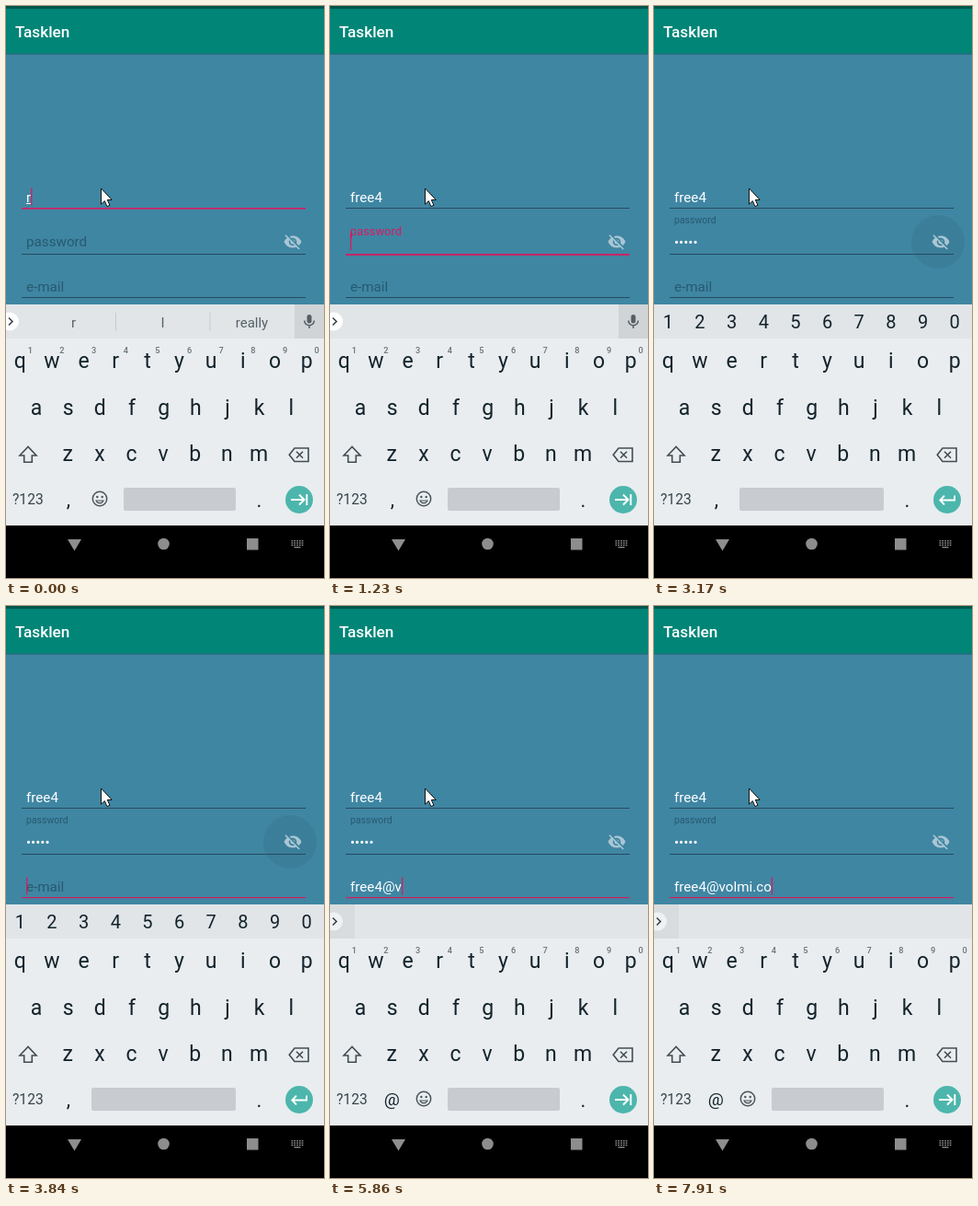
Animation of 346 by 621 pixels, one loop 8 s. Source, as an HTML page:

```html
<!DOCTYPE html>
<html lang="en">
<head>
<meta charset="utf-8">
<title>Sign-up form</title>
<style>
html, body { margin: 0; width: 100%; height: 100%; overflow: hidden; background: #000; }
svg { display: block; width: 346px; height: 621px; font-family: Roboto, sans-serif; }
</style>
</head>
<body>
<svg id="stage" viewBox="0 0 346 621"></svg>
<script>
const LOOP = 8000, SIZE = 15.2, LEFT = 22;
const PINK = '#d81b60', INK = '#13232b', GREY = '#566168', HINT = '#275a6f';

// Each step changes part of the state and holds until the next one.
const steps = [
  [0, { focus: 'user', user: 'r', pass: '', mail: '', composing: true, cursor: true,
        words: ['r', 'I', 'really'], keys: 'text', enter: 'next', rise: 0, ripple: false }],
  [140, { user: '', words: [] }],
  [270, { user: 'f', words: ['f', 'I', 'for'] }],
  [410, { user: 'fr', words: ['fr', 'from', 'free'] }],
  [680, { user: 'fre', words: ['fre', 'free', 'freeing'] }],
  [830, { user: 'free', words: ['free', 'freely', 'freedom'] }],
  [950, { user: 'free4', words: ['free4'] }],
  [1230, { focus: 'pass', composing: false, words: [], rise: .5 }],
  [1370, { keys: 'pass', rise: 1 }],
  [1500, { pass: 't' }],
  [1780, { pass: '••s' }],
  [2370, { cursor: false }],
  [2650, { pass: '•••t', cursor: true }],
  [3050, { pass: '••••1' }],
  [3170, { pass: '•••••', focus: 'eye', enter: 'return', ripple: true }],
  [3840, { focus: 'mail' }],
  [3990, { keys: 'mail', enter: 'next', ripple: false }],
  [4120, { mail: 'f', composing: true, words: ['f', 'f+'] }],
  [4250, { mail: 'fr', words: ['fr', 'fr+'] }],
  [4380, { mail: 'fre', words: ['fre', 'fre+'] }],
  [4500, { mail: 'free', words: ['free', 'free+'] }],
  [4870, { mail: 'free4', words: ['free4'] }],
  [5430, { mail: 'free4@', composing: false, words: [] }]
];
const typeDomain = (start, gap, parts) => parts.forEach((part, i) =>
  steps.push([start + gap * i, { mail: 'free4@' + part, words: part.endsWith('.c') ? ['c'] : [] }]));
typeDomain(5860, 138.5, ['v', 'vo', 'vol', 'voli', 'volim', 'vol', 'vo', 'v']);
typeDomain(6970, 156.6, ['vo', 'vol', 'volm', 'volmi', 'volmi.', 'volmi.c', 'volmi.co']);

const ruler = document.createElement('canvas').getContext('2d');
const measure = s => {
  ruler.font = `${SIZE}px Roboto, sans-serif`;
  return ruler.measureText(s).width;
};

const rect = (x, y, w, h, fill, extra = '') =>
  `<rect x="${x}" y="${y}" width="${w}" height="${h}" fill="${fill}" ${extra}/>`;
const circle = (x, y, r, fill, extra = '') =>
  `<circle cx="${x}" cy="${y}" r="${r}" fill="${fill}" ${extra}/>`;
const text = (s, x, y, size, fill, extra = '') =>
  `<text x="${x}" y="${y}" font-size="${size}" fill="${fill}" ${extra}>${s}</text>`;
const mid = (s, x, y, size, fill, extra = '') =>
  text(s, x, y, size, fill, 'text-anchor="middle" ' + extra);
const stroke = (d, color, width) =>
  `<path d="${d}" fill="none" stroke="${color}" stroke-width="${width}"/>`;
const shape = (d, fill, extra = '') => `<path d="${d}" fill="${fill}" ${extra}/>`;
const row = (chars, x, y, size, fill, extra) =>
  [...chars].map((c, i) => mid(c, x + 34.65 * i, y, size, fill, extra)).join('');

const EYE = 'M12 7c2.76 0 5 2.24 5 5 0 .65-.13 1.26-.36 1.83l2.92 2.92c1.51-1.26 2.7-2.89 3.43-4.75' +
  '-1.73-4.39-6-7.5-11-7.5-1.4 0-2.74.25-3.98.7l2.16 2.16C10.74 7.13 11.35 7 12 7z' +
  'M2 4.27l2.74 2.74C3.08 8.3 1.78 10.02 1 12c1.73 4.39 6 7.5 11 7.5 1.55 0 3.03-.3 4.38-.84' +
  'L19.73 22 21 20.73 3.27 3z' +
  'M7.53 9.8l1.55 1.55c-.05.21-.08.43-.08.65 0 1.66 1.34 3 3 3 .22 0 .44-.03.65-.08l1.55 1.55' +
  'c-.67.33-1.41.53-2.2.53-2.76 0-5-2.24-5-5 0-.79.2-1.53.53-2.2z' +
  'm4.31-.78l3.15 3.15.02-.16c0-1.66-1.34-3-3-3z';

function field(s, name, base, lineY, heavy) {
  const on = s.focus === name, value = s[name], w = measure(value);
  let out = on ? rect(17, lineY, 309, heavy, PINK) : rect(17, lineY, 309, 1, '#264b5c');
  out += text(value, LEFT, base, SIZE, '#fff');
  if (on && s.composing && value) out += rect(LEFT, base + 1, w, 1, '#fff');
  if (on && s.cursor) out += rect(LEFT + w, base - 15.5, 1.3, 19, PINK);
  return out;
}

function form(s) {
  const rise = s.rise, labelColor = s.focus === 'pass' ? PINK : HINT;
  return rect(0, 0, 346, 324, '#3f86a3') +
    rect(0, 51, 346, 2, '#2d6f83') +
    rect(0, 0, 346, 3, '#00574b') + rect(0, 3, 346, 48.5, '#008577') +
    text('Tasklen', 10, 33.5, 17.2, '#fff', 'font-weight="500"') +
    (s.ripple ? circle(309, 256, 29, '#000', 'opacity=".06"') : '') +
    text('password', LEFT, 261 - 25 * rise, SIZE - 4.7 * rise, labelColor) +
    (s.mail ? '' : text('e-mail', LEFT, 310, SIZE, HINT)) +
    field(s, 'user', 213, 219, 1.6) +
    field(s, 'pass', 261.5, 269, 1.8) +
    field(s, 'mail', 310, 316, 1.2) +
    shape(EYE, '#a9c6d3', 'transform="translate(301.7 245.7) scale(.86)"');
}

function strip(s) {
  if (s.keys === 'pass') return row('1234567890', 15.3, 350, 20, INK);
  const mail = s.keys === 'mail', [a, b, c] = s.words;
  let out = mail ? rect(0, 324, 27, 37, '#d8dcde') : rect(314, 324, 32, 37, '#d0d4d7');
  out += circle(4, 342.5, 10, mail ? '#eff2f4' : '#fff') + stroke('M3 338.5l4 4-4 4', '#37424a', 1.6);
  if (!mail) {
    out += rect(327.5, 335, 5, 9.5, '#555f65', 'rx="2.5"') +
      stroke('M324.7 341.5a5.3 5.3 0 0 0 10.6 0M330 347v3', '#555f65', 1.5);
  }
  if (!a) return out;
  if (!b) return out + mid(a, 170.5, 349, 15, GREY);
  out += rect(119, 333, 1, 20, '#c6cbce') + rect(221.5, 333, 1, 20, '#c6cbce');
  out += mid(a, 73.5, 349, 15, GREY);
  if (!b.endsWith('+')) return out + mid(b, 170.5, 349, 15, GREY) + mid(c, 267.5, 349, 15, GREY);
  return out + mid(b.slice(0, -1), 170.5, 338.5, 13.7, GREY, 'font-weight="500"') +
    mid('@volmi.com', 170.5, 353, 10.6, GREY);
}

function keyboard(s) {
  const pass = s.keys === 'pass', spaceX = pass ? 93 : 128;
  let out = rect(0, 324, 346, 240, '#e9edf0') + rect(0, 324, 346, 37, '#e1e5e8') + strip(s);
  out += row('qwertyuiop', 15.3, 393, 23, INK) + row('asdfghjkl', 33, 444, 23, INK) +
    row('zxcvbnm', 67.2, 494, 23, INK);
  if (!pass) out += row('1234567890', 26.3, 376.5, 9.2, '#677277', 'font-weight="500"');
  out += stroke('M24 478.5L15 488h4.7v7.3h8.6V488H33z', '#424d53', 1.6) +
    stroke('M314 480h15v14.5h-15l-5.8-7.2zM316 483.8l7 7m0-7l-7 7', '#424d53', 1.6) +
    text('?123', 7, 541, 15.6, '#37444b') +
    (s.keys === 'mail' ? mid('@', 67.3, 542, 19, INK) : mid(',', 68, 543, 22, INK)) +
    mid('.', 275.5, 543.5, 22, INK) +
    rect(spaceX, 523, 250 - spaceX, 25, '#c8ccd0', 'rx="2"');
  if (!pass) {
    out += circle(102, 535, 7.7, 'none', 'stroke="#4a555b" stroke-width="1.5"') +
      circle(99.3, 533, 1.2, '#4a555b') + circle(104.7, 533, 1.2, '#4a555b') +
      stroke('M98 537a4.3 4.3 0 0 0 8 0z', '#4a555b', 1.2);
  }
  out += circle(319, 536, 15, '#4db6ac');
  return out + stroke(s.enter === 'next'
    ? 'M310 536h14M319 530.5l5.5 5.5-5.5 5.5M327.3 530v12'
    : 'M327 531.5v5h-15.5M316 531.7l-4.7 4.8 4.7 4.8', '#fff', 1.9);
}

function navBar() {
  let dots = '';
  for (let i = 0; i < 15; i++) dots += rect(310.5 + i % 5 * 2.8, 580 + Math.floor(i / 5) * 2.3, 1.7, 1.4, '#8d8d8d');
  return rect(0, 564, 346, 57, '#000') + shape('M67 579h15l-7.5 12.5z', '#8d8d8d') +
    circle(171.5, 584, 6.3, '#8d8d8d') + rect(262, 578, 12.5, 12.5, '#8d8d8d') +
    dots + rect(313.5, 587, 7, 1.3, '#8d8d8d');
}

const pointer = shape('M103.5 198v17.2l3.8-3.6 2.6 6 3-1.3-2.6-5.8h5z', '#fff',
  'stroke="#111" stroke-width="1"');

const stage = document.getElementById('stage');
let shown = 0;
function frame(now) {
  const t = now % LOOP;
  const past = steps.filter(([at]) => at <= t);
  if (past.length !== shown) {
    shown = past.length;
    const s = Object.assign({}, ...past.map(([, change]) => change));
    stage.innerHTML = form(s) + keyboard(s) + navBar() + pointer;
  }
  requestAnimationFrame(frame);
}
const begin = performance.now();
const tick = () => frame(Math.max(0, performance.now() - begin));
const nativeFrame = window.requestAnimationFrame.bind(window);
window.requestAnimationFrame = () => nativeFrame(tick);
tick();
</script>
</body>
</html>
```
